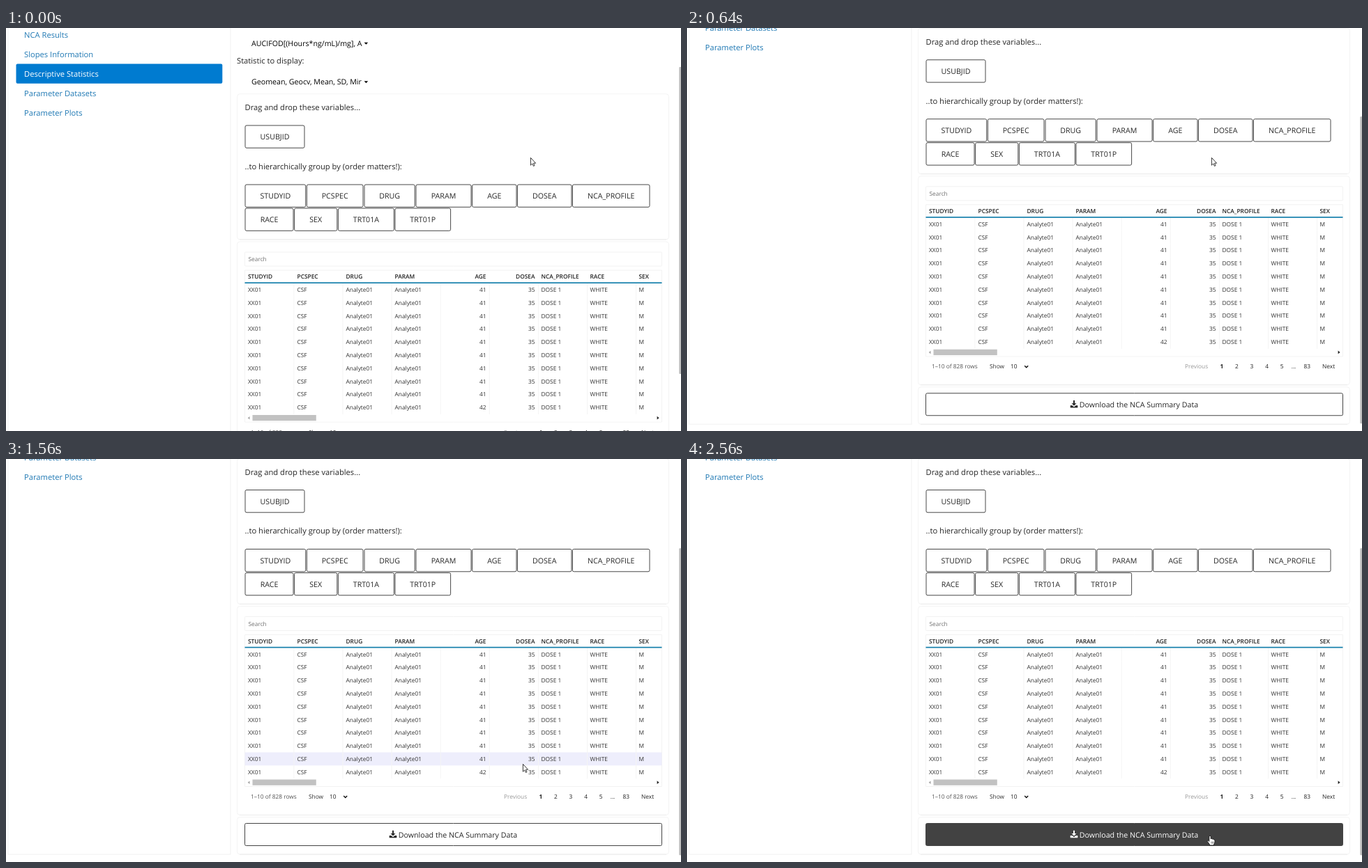
These frames come from a looping animation (968 px wide and 579 px high, 2.6 s). An HTML page with a canvas:

```html
<!DOCTYPE html>
<html lang="en">
<head>
<meta charset="utf-8">
<title>Descriptive statistics</title>
<style>
html, body { margin: 0; width: 100%; height: 100%; overflow: hidden; background: #fff; }
canvas { display: block; }
</style>
</head>
<body>
<canvas id="stage" width="968" height="579"></canvas>
<script>
const LOOP = 2600, SCROLL = 95.5;
const ctx = document.getElementById('stage').getContext('2d');
const SMALL = 8.35, BUTTON = 10.65, BODY = 11.2;
const INK = '#262626', FAINT = '#f2f2f2';

// All page coordinates are those of the fully scrolled view.
const chips = [
  [44.5, [['USUBJID', 343, 428]]],
  [129.5, [['STUDYID', 343, 429.7], ['PCSPEC', 431.4, 512], ['DRUG', 514, 586.2], ['PARAM', 588, 667],
    ['AGE', 668.6, 732], ['DOSEA', 733.4, 811], ['NCA_PROFILE', 812.4, 923]]],
  [163.5, [['RACE', 343, 412], ['SEX', 413.6, 474.8], ['TRT01A', 476.4, 556.4], ['TRT01P', 558, 637.6]]]
];
const columns = [
  ['STUDYID', 'XX01', 347], ['PCSPEC', 'CSF', 417.5], ['DRUG', 'Analyte01', 487.5],
  ['PARAM', 'Analyte01', 557.5], ['AGE', '41', 688.5, 'right'], ['DOSEA', '35', 758.5, 'right'],
  ['NCA_PROFILE', 'DOSE 1', 767.5], ['RACE', 'WHITE', 837.5], ['SEX', 'M', 907.5]
];
const ROW_TOP = 271.5, ROW_HEIGHT = 18.8;
const button = { x: 342.5, y: 523.5, w: 598, h: 32 };

// Pointer position: time, x, y
const pointer = [[0, 752, 186], [1160, 752, 186], [1560, 741, 438], [1800, 747, 529], [2040, 747, 532],
  [2320, 750, 541], [2600, 750, 541]];

const clamp = v => Math.min(1, Math.max(0, v));
const mix = (a, b, k) => a + (b - a) * k;
const progress = (t, start, length) => clamp((t - start) / length);
const gray = v => `rgb(${v},${v},${v})`;

// cubic-bezier(.42, 0, .58, 1)
function easeInOut(x) {
  let lo = 0, hi = 1;
  for (let i = 0; i < 20; i++) {
    const u = (lo + hi) / 2;
    if (3 * u * (1 - u) * (.42 * (1 - u) + .58 * u) + u ** 3 < x) lo = u; else hi = u;
  }
  return lo * lo * (3 - 2 * lo);
}

function pointerAt(t) {
  const i = Math.max(1, pointer.findIndex(p => p[0] > t));
  const [a, b] = [pointer[i - 1], pointer[i]];
  const k = progress(t, a[0], b[0] - a[0]), e = k * k * (3 - 2 * k);
  return { x: mix(a[1], b[1], e), y: mix(a[2], b[2], e) };
}

// y is the middle of the capital letters
function text(str, x, y, size, color = INK, align = 'left', weight = 400) {
  ctx.font = `${weight} ${size}px "Open Sans", sans-serif`;
  ctx.textAlign = align;
  ctx.fillStyle = color;
  ctx.fillText(str, x, y + size * .357);
}

function box(x, y, w, h, radius, stroke, fill) {
  ctx.beginPath();
  ctx.roundRect(x, y, w, h, radius);
  if (fill) { ctx.fillStyle = fill; ctx.fill(); }
  if (stroke) { ctx.strokeStyle = stroke; ctx.lineWidth = 1; ctx.stroke(); }
}

function rect(x, y, w, h, color) {
  ctx.fillStyle = color;
  ctx.fillRect(x, y, w, h);
}

function card(y, h) {
  box(331.5, y, 619, h, 4, '#f4f4f4');
  rect(335, y + h - .5, 612, 1, '#ebebeb');
}

function shape(d, x, y, fill, stroke, width = 1) {
  const path = new Path2D(d);
  ctx.save();
  ctx.translate(x, y);
  if (fill) { ctx.fillStyle = fill; ctx.fill(path); }
  if (stroke) { ctx.strokeStyle = stroke; ctx.lineWidth = width; ctx.stroke(path); }
  ctx.restore();
}

function drawSidebar() {
  rect(2.5, -120, 1, 688, FAINT);
  rect(321.5, -120, 1, 688, FAINT);
  rect(2.5, 567.5, 320, 1, FAINT);
  box(14.5, -44, 295.8, 28.2, 2, null, '#007bd0');
  ['NCA Results', 'Slopes Information', 'Descriptive Statistics', 'Parameter Datasets', 'Parameter Plots']
    .forEach((label, i) => text(label, 26, -85.5 + 28 * i, BODY, i === 2 ? '#fff' : '#2079b4'));
}

function drawPicker(label, y) {
  text(label, 352, y, BUTTON, '#000');
  shape('M-2.8-1.3H2.8L0 1.7Z', 516.4, y, '#000');
}

function drawGrouping() {
  drawPicker('AUCIFOD[(Hours*ng/mL)/mg], A', -73.5);
  text('Statistic to display:', 331, -48, BODY);
  drawPicker('Geomean, Geocv, Mean, SD, Mir', -18);
  card(-.8, 209.2);
  text('Drag and drop these variables...', 342.5, 18.8, BODY);
  text('..to hierarchically group by (order matters!):', 342.5, 103.3, BODY);
  for (const [y, row] of chips) {
    for (const [label, left, right] of row) {
      box(left, y, right - left, 32.3, 2, '#484848');
      text(label, (left + right) / 2, y + 16.4, BUTTON, INK, 'center');
    }
  }
}

function drawTable(mouse) {
  card(211.5, 300);
  box(342.5, 226.5, 598, 20, 1, FAINT);
  text('Search', 347.5, 236.7, SMALL, '#707070');
  box(342.5, 252.5, 598, 218, 0, FAINT);
  for (const [title, , x, align] of columns) text(title, x, 261.8, SMALL, '#222', align, 600);

  for (let i = 0; i < 10; i++) {
    const top = ROW_TOP + i * ROW_HEIGHT;
    if (mouse.y >= top && mouse.y < top + ROW_HEIGHT) rect(342.5, top - .4, 598, ROW_HEIGHT, '#eeeefc');
    for (let c = 1; c < 9; c++) rect(342.3 + c * 70.1, top, 1, ROW_HEIGHT, '#f4f4f4');
    for (const [title, value, x, align] of columns) {
      const shown = title === 'AGE' && i === 9 ? '42' : value;
      text(shown, x, top + 9.1, SMALL, '#333', align);
    }
  }
  rect(342.5, 269.8, 598, 1.7, '#1680ac');

  rect(343, 459.7, 597, 10.3, '#fff');
  rect(353.5, 460.5, 91.3, 8.3, '#c2c2c2');
  shape('M1.5-2.2V2.2L-1.3 0Z', 348, 464.7, '#a3a3a3');
  shape('M-1.4-2.4V2.4L1.6 0Z', 935, 464.7, '#222');

  text('1–10 of 828 rows', 351, 485.2, SMALL, '#555');
  text('Show', 434, 485.2, SMALL, '#333');
  text('10', 464, 485.2, SMALL, '#222');
  shape('M-2.5-1.2L0 1.3L2.5-1.2', 486.7, 485.2, null, '#111', 1.4);
  text('Previous', 714, 485.2, SMALL, '#999');
  ['1', '2', '3', '4', '5'].forEach((n, i) =>
    text(n, 766.8 + 21.6 * i, 485.2, SMALL, '#222', 'center', i ? 400 : 700));
  text('...', 870, 485.2, SMALL, '#222', 'center');
  text('83', 889.3, 485.2, SMALL, '#222', 'center');
  text('Next', 911, 485.2, SMALL, '#222');
}

function drawDownload(hover, press) {
  const ink = gray(mix(38, 255, press));
  card(514.5, 53.5);
  box(button.x, button.y, button.w, button.h, 2, '#444', gray(mix(mix(255, 238, hover), 66, press)));
  shape('M-1-5.6H1V-1.4H3.4L0 2.2L-3.4-1.4H-1Z', 555, 539.3, ink);
  shape('M-5.3 1.6H-2.6L0 4L2.6 1.6H5.3V5H-5.3Z', 555, 539.3, ink);
  text('Download the NCA Summary Data', 562.8, 539.7, BUTTON, ink);
}

function drawPointer({ x, y }, overButton) {
  if (overButton) {
    shape('M-1.2 1Q0-.9 1.2 1V4.6Q2.6 3.8 3.4 5.1Q4.8 4.5 5.4 5.8Q6.9 5.6 7 7.2V9.4Q6.8 11.4 5.6 12.6V14' +
      'H-.6V12.7L-3.6 8.7Q-4.2 7-2.6 7L-1.2 8.4Z', x, y, '#fff', '#111', .9);
    shape('M2 8.6V11.6M3.6 8.6V11.6M5.2 8.6V11.6', x, y, null, '#333', .6);
  } else {
    shape('M.4.4V11.2L2.8 8.9L4.4 12.4L6 11.7L4.5 8.2H7.6Z', x, y, '#fff', '#222', .9);
  }
}

function draw(t) {
  const scrolled = SCROLL * easeInOut(progress(t, 340, 328));
  const mouse = pointerAt(t);
  const overButton = mouse.y > button.y;

  rect(0, 0, 968, 579, '#fff');
  ctx.save();
  ctx.translate(0, SCROLL - scrolled);
  drawSidebar();
  drawGrouping();
  drawTable(mouse);
  drawDownload(progress(t, 1770, 150), progress(t, 2380, 150));
  ctx.restore();

  box(965.3, 56 + scrolled * .757, 4, 441, 1, null, '#bdbdbd');
  drawPointer(mouse, overButton);
}

ctx.textRendering = 'geometricPrecision';
function frame(now) {
  draw(now % LOOP);
  requestAnimationFrame(frame);
}
draw(0);
requestAnimationFrame(frame);
</script>
</body>
</html>
```
